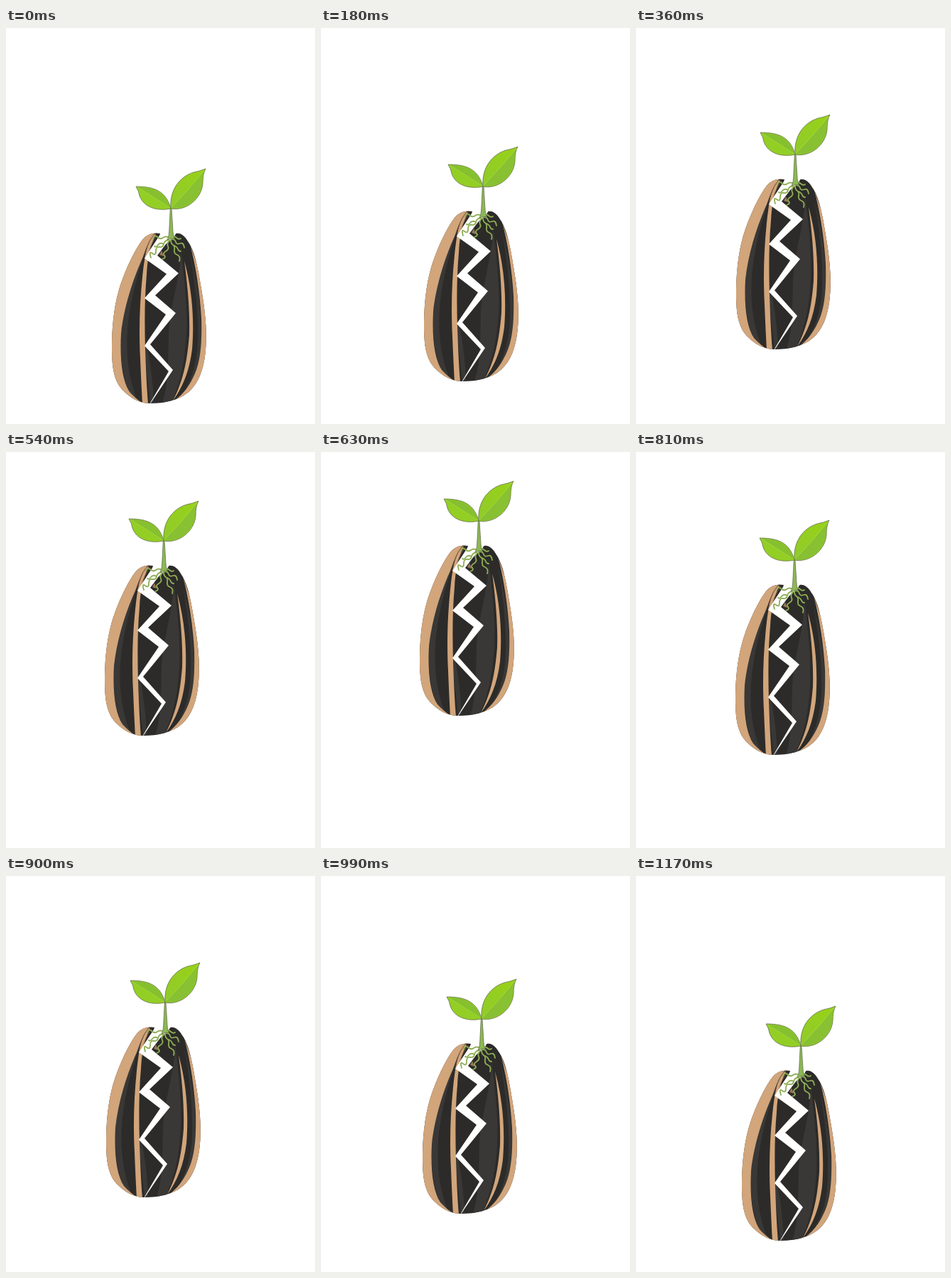
Recreate the animation shown at these times as an HTML page. Size 435 by 557 pixels, loop 1.26 s.

```html
<!DOCTYPE html>
<html lang="en">
<head>
<meta charset="utf-8">
<title>Sprouting seed</title>
<style>
  html, body { margin: 0; width: 100%; height: 100%; overflow: hidden; background: #fff; }
  svg { display: block; width: 100vw; height: 100vh; }
  .tan { fill: #d2a57b; }
  .dark { fill: #2c2b29; }
  .sheen { fill: #393836; }
  .roots { fill: none; stroke: #8fae55; stroke-width: 1.8; stroke-linecap: round; stroke-linejoin: round; }
  .edge { stroke: #66704f; stroke-width: .8; stroke-linejoin: round; }
</style>
</head>
<body>
<svg viewBox="0 0 435 557">
  <defs>
    <clipPath id="shell">
      <path d="M217 289C206 287 198 291 192 298C181 312 167 342 159 368C151 396 149 425 149 450C149 478 152 498 166 511C177 522 190 528 203 528C224 528 243 524 257 512C271 500 277 482 280 462C284 432 281 402 275 367C270 335 265 312 256 300C251 292 246 288 240 289Z"/>
    </clipPath>
    <linearGradient id="leaf" x1="0" y1="1" x2="1" y2="0">
      <stop offset="0" stop-color="#90ca2c"/><stop offset="1" stop-color="#98d216"/>
    </linearGradient>
  </defs>

  <g id="sprout">
    <g clip-path="url(#shell)">
      <rect class="dark" x="140" y="280" width="150" height="255"/>

      <!-- soft highlights on the dark shell -->
      <path class="sheen" d="M198 310C181 345 165 390 162 430C160 465 165 495 176 520L184 522C172 490 169 460 171 425C175 380 187 340 198 310Z"/>
      <path class="sheen" d="M246 312C246 350 231 390 229 430C228 470 229 500 220 528L234 524C247 495 252 465 254 430C256 395 251 350 246 312Z"/>
      <path class="sheen" d="M195 450C197 480 201 505 203 528L208 528C207 500 204 474 199 450Z"/>
      <path class="sheen" d="M259 318C266 355 271 400 270 440C269 470 262 492 252 510L258 506C269 490 274 464 275 438C276 400 268 350 259 318Z"/>

      <!-- pale stripes -->
      <path class="tan" d="M216 286L208 290C201 298 197 311 192 324C179 353 166 392 162 430C160 468 164 497 174 512C180 519 187 524 194 529L140 535V280Z"/>
      <path class="tan" d="M207 291C198 303 195 322 192 350C188 390 187 425 189 465C190 490 191 510 192 529L200 529C198 505 197 480 196 452C195 415 195 380 198 347C199 324 203 306 211 290Z"/>
      <path d="M213 291Q202 306 199 324M208 291Q197 306 195 324" fill="none" stroke="#6f513b" stroke-width=".8"/>
      <path d="M204 300Q200 311 199 321" fill="none" stroke="#d2a57b" stroke-width="1.5"/>
      <path class="tan" d="M251 328C256 365 259 400 258 432C255 470 249 497 235 524C249 505 258 483 262 452C265 415 263 370 251 328Z"/>
      <path class="tan" d="M259 304C267 334 273 372 275 408C276 442 274 467 266 486C259 502 251 514 237 524L258 521L290 480V395Z"/>
    </g>

    <!-- crack -->
    <path fill="#fff" d="M218 286L216 292L195 324L226 346L195 380L225 403L195 447L229 483L202 529L204 527L235 481L203 445L239 401L210 376L243 345L213 320L225 304L237 293L241 286Z"/>
    <path d="M219 313L222 321L216 319Z" fill="#9a7658"/>

    <g class="roots">
      <path d="M230 295q-5-3-9 0t-8-1t-6 3"/>
      <path d="M229 298q-6 1-7 6t-6 4t-5 6t-5 3t-2 6"/>
      <path d="M230 299q-4 4-2 8t-3 7t-2 6t-3 5"/>
      <path d="M232 298q0 5 3 7t2 7t4 7t3 9"/>
      <path d="M233 297q5 0 6 4t6 2t6 6"/>
      <path d="M233 295q4-3 7 0t6 1"/>
      <path d="M222 304q-5-3-8 1t-5 2"/>
      <path d="M237 306q4 2 5 5t4 3"/>
    </g>

    <path class="edge" fill="#8cb853" d="M231.3 254H233L235 286Q235.5 295 238 297Q232 295 227 298Q229.5 294 229.7 286Z"/>

    <path class="edge" fill="#93ce25" d="M183 223C203 223 225 226 232 254C214 258 194 253 188 236Q187 229 183 223Z"/>
    <path fill="#86c02f" d="M185 224Q205 236 231 253C224 228 203 224 185 224Z"/>
    <path fill="none" stroke="#a0d63c" d="M185 224Q205 236 231 253"/>

    <path class="edge" fill="url(#leaf)" d="M232 254C230 227 245 209 264 203Q274 201 281 198Q277 205 277 219C275 241 253 258 232 254Z"/>
    <path fill="#86bf35" d="M233 253Q252 232 279 201Q276 207 276 219C274 240 253 256 233 253Z" opacity=".85"/>
    <path fill="none" stroke="#a4d93c" d="M233 252Q255 230 279 200"/>
  </g>
</svg>
<script>
  const STEP = 90, COUNT = 14;
  const sprout = document.getElementById('sprout');
  // Offsets on the way up; the way down mirrors them.
  const shiftX = [0, 0, -4, -6, -8, -9, -10, -10];
  const shiftY = [0, -15, -31, -53, -76, -102, -129, -157];

  function draw(time) {
    const k = Math.floor(time / STEP) % COUNT;
    const i = Math.min(k, COUNT - k);
    sprout.setAttribute('transform', `translate(${shiftX[i]} ${shiftY[i]})`);
  }

  const start = performance.now();
  function tick() {
    draw(performance.now() - start);
    requestAnimationFrame(tick);
  }
  tick();
</script>
</body>
</html>
```
